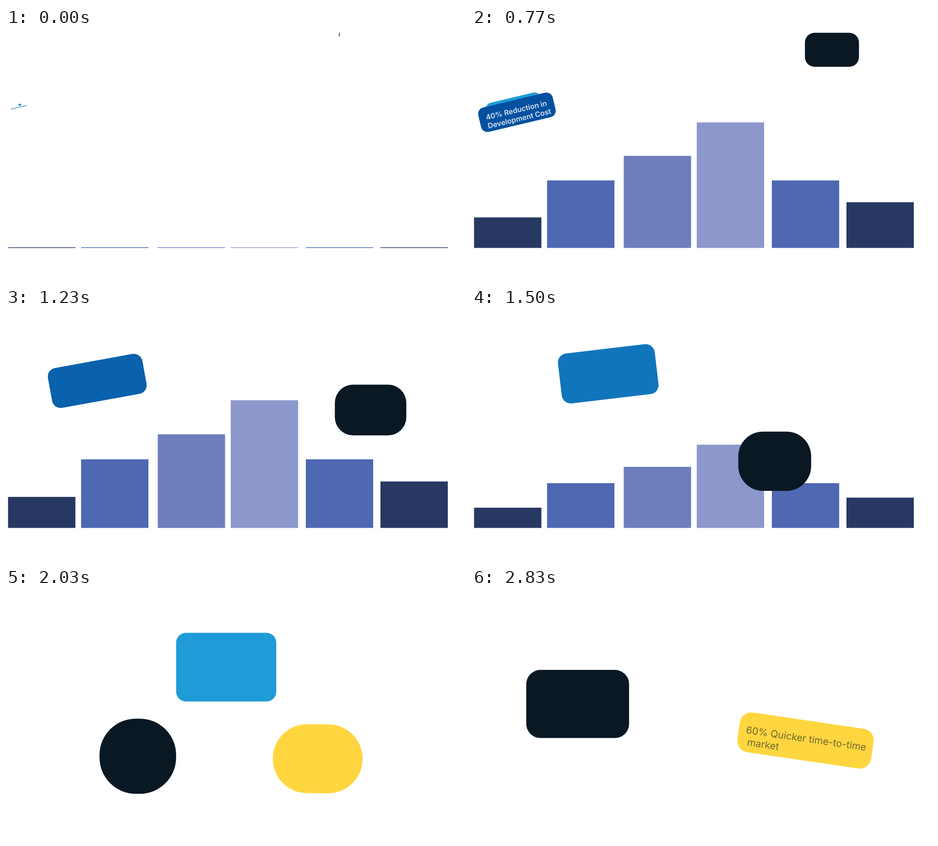
Animation, 1011 px wide and 554 px high, one loop 5.01 s. Source, as an HTML page with a canvas:

```html
<!DOCTYPE html>
<html lang="en">
<head>
<meta charset="utf-8">
<style>
  html, body { margin: 0; width: 100%; height: 100%; overflow: hidden; background: #fff; }
  canvas { display: block; }
</style>
</head>
<body>
<canvas id="stage" width="1011" height="554"></canvas>
<script>
const ctx = document.getElementById('stage').getContext('2d');
const LOOP = 5010, STEP = 100 / 3, LAST = 85;
const NAVY = '#0a1824', SKY = [31, 155, 216], COBALT = [4, 80, 160], YELLOW = '#ffd640';

// x, full height, colour
const BARS = [
  [4.5, 87.5, '#273862'], [165, 193.5, '#4e68b1'], [333.5, 264, '#6e7dbb'],
  [494, 360, '#8c97cb'], [659, 193.5, '#4e68b1'], [823, 131, '#273862']
];

const clamp = v => Math.max(0, Math.min(1, v));
const mix = (a, b, p) => a + (b - a) * p;
const quad = (a, b, c, p) => mix(mix(a, b, p), mix(b, c, p), p);
const cubic = (a, b, c, d, p) => mix(quad(a, b, c, p), quad(b, c, d, p), p);
const rgb = c => `rgb(${c.map(Math.round)})`;

function box(x, y, w, h, r, color) {
  ctx.beginPath();
  ctx.roundRect(x, y, w, h, Math.min(r, w / 2, h / 2));
  ctx.fillStyle = color;
  ctx.fill();
}

function turned(x, y, degrees, draw) {
  ctx.save();
  ctx.translate(x, y);
  ctx.rotate(degrees * Math.PI / 180);
  draw();
  ctx.restore();
}

function centred(cx, cy, w, h, r, degrees, color) {
  turned(cx, cy, degrees, () => box(-w / 2, -h / 2, w, h, r, color));
}

function label(lines, x, y, leading, font, color, alpha) {
  ctx.globalAlpha = clamp(alpha);
  ctx.font = font + ' Inter, sans-serif';
  ctx.fillStyle = color;
  lines.forEach((line, i) => ctx.fillText(line, x, y + i * leading));
  ctx.globalAlpha = 1;
}

function bars(scale) {
  for (const [x, full, color] of BARS) {
    const h = Math.max(1.5, full * scale);
    ctx.fillStyle = color;
    ctx.fillRect(x, 483.5 - h, 148, h);
  }
}

function grow(n) {
  const p = n / 30;
  bars(p);
  turned(10.5, 178, -13.4, () => {
    box(18, -6.3, 7 + 5.17 * n, 4 + 2 * n, 2 + 0.6 * n, rgb(SKY));
    box(0, 0, 36 + 5.75 * n, 1 + 2.35 * n, 0.63 * n, rgb(COBALT));
    label(['40% Reduction in', 'Development Cost'], 15, 28.5, 19.4, '600 16px', '#fff', (p - 0.5) * 3.2);
  });
  box(731.7, 10.5, 1.5 + 5.1 * n, 8 + 2.9 * n, 0.93 * n, NAVY);
}

function swap(p) {
  if (p <= 0.5) {
    bars(1 - p);
  } else {
    ctx.save();
    centred(mix(579, 683, p), mix(275, 377, p), 193 * p, 154 * p, 77 * p, 0, YELLOW);
    ctx.clip();
    ctx.globalAlpha = (1 - p) * 0.85;
    bars(1 - p);
    ctx.restore();
  }
  centred(quad(120, 303, 484, p), quad(189, 107.5, 174, p),
    mix(208.5, 220, p), mix(71.5, 151, p), mix(18.5, 21.5, p), -13.2 * (1 - p),
    rgb(COBALT.map((c, i) => mix(c, SKY[i], p))));
  centred(cubic(809, 891, 499, 298, p), cubic(57.5, 370, 390.5, 373, p),
    mix(154.5, 166, p), mix(96, 166, p), mix(28, 82, p), 0, NAVY);
}

function settle(p) {
  if (p <= 0.5) centred(484, 174, 220, 151, 21.5, 0, rgb(SKY));
  centred(quad(298, 170, 254.5, p), quad(373, 326.6, 221.6, p),
    166 + 72 * p, 166 - 19.5 * p, mix(82, 21, p), 0, NAVY);
  const w = mix(193, 318, p), h = mix(154, 75, p);
  turned(mix(683, 743, p), mix(377, 327, p), 10 * p, () => {
    box(-w / 2, -h / 2, w, h, mix(77, 15, p), YELLOW);
    label(['60% Quicker time-to-time', ' market'], 16.2 - w / 2, 47.2 - h / 2, 26.2, '400 21.6px', NAVY, (p - 0.5) * 1.75);
  });
}

function frame(now) {
  const n = Math.min(LAST, Math.floor((now % LOOP) / STEP + 0.11));
  ctx.clearRect(0, 0, 1011, 554);
  if (n <= 30) grow(n);
  else if (n < 60) swap((n - 30.5) / 29.5);
  else settle((n - 60) / 30);
  requestAnimationFrame(frame);
}
requestAnimationFrame(frame);
</script>
</body>
</html>
```
